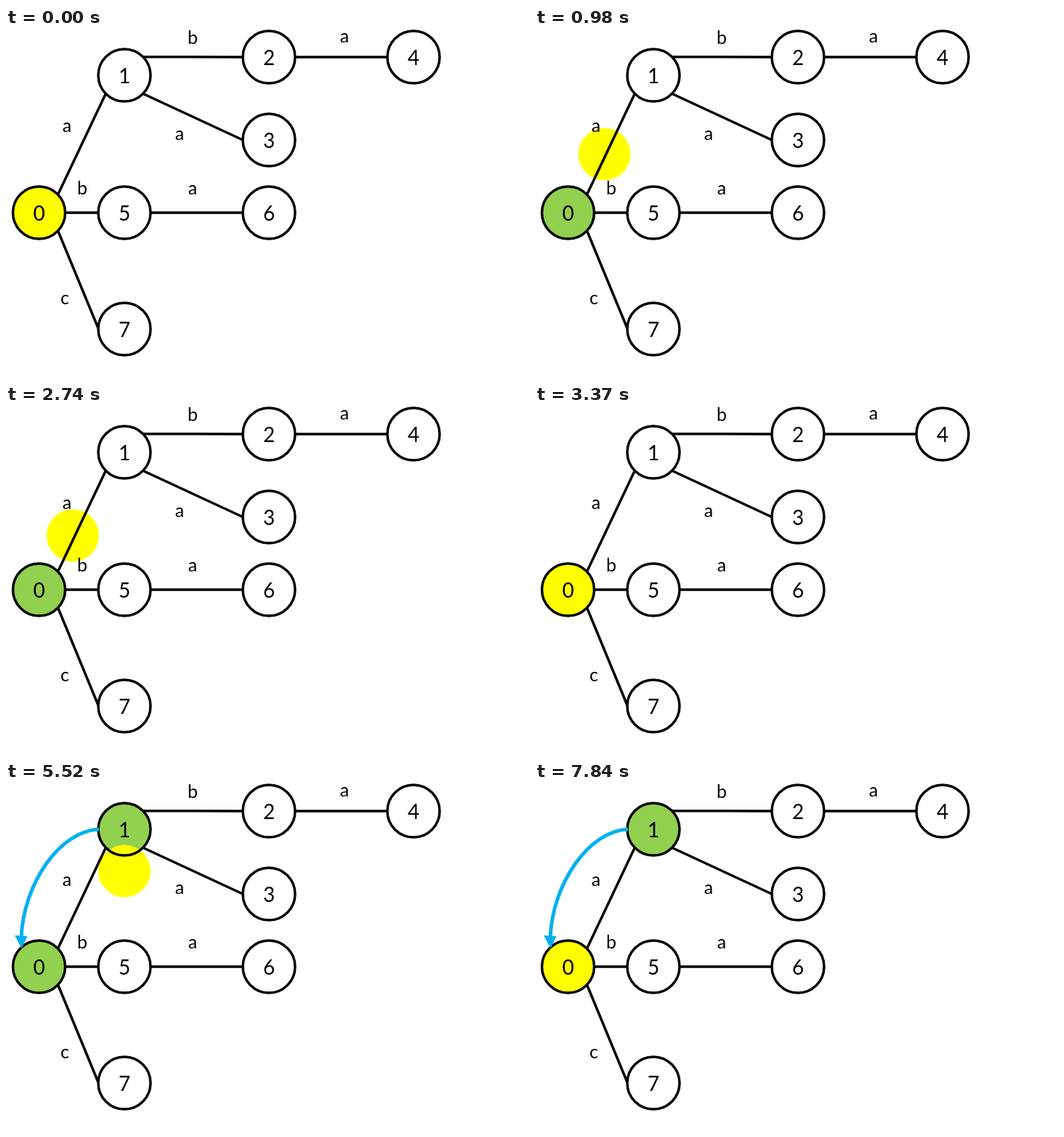
An HTML page with a canvas for the animation above (8 s loop, 720 px wide and 480 px high).

```html
<!DOCTYPE html>
<html lang="en">
<head>
<meta charset="utf-8">
<title>Trie traversal</title>
<style>
  html, body { margin: 0; width: 100%; height: 100%; overflow: hidden; background: #fff; }
  canvas { display: block; }
</style>
</head>
<body>
<canvas id="stage" width="720" height="480"></canvas>
<script>
const ctx = document.getElementById('stage').getContext('2d');
const LOOP = 8000, RADIUS = 36, GLIDE = 900;
const YELLOW = '#ffff00', GREEN = '#92d050', BLUE = '#00b0f0';

const nodes = [[45.5, 254], [163, 65], [362, 40], [362, 154],
               [561, 40], [163, 254], [362, 254], [163, 414]];

const edges = [[72, 228, 137, 91], [82, 254, 127, 254], [72, 280, 127, 413],
               [189, 39.5, 326, 40], [190, 91, 326, 154],
               [398, 40, 525, 40], [199, 254, 326, 254]];

const labels = [['a', 84, 143], ['b', 105, 229], ['c', 81, 380], ['b', 257, 22],
                ['a', 239, 154], ['a', 466, 20], ['a', 257, 229]];

// Each move advances in short held poses; glide is when its easing begins.
const moves = [
  { from: 0, to: 1, first: 510, last: 1670, steps: 12, glide: 775 },
  { from: 1, to: 0, first: 2450, last: 3370, steps: 9, glide: 2422 },
  { from: 0, to: 1, first: 3950, last: 4760, steps: 7, glide: 3905 },
  { from: 1, to: 5, first: 5440, last: 6430, steps: 10, glide: 5390 },
  { from: 5, to: 0, first: 7030, last: 7840, steps: 7, glide: 6980 }
];

const clamp = x => Math.max(0, Math.min(1, x));
const easeOut = x => 1 - (1 - x) ** 2;

function poseAt(t) {
  const index = moves.findLastIndex(m => t >= m.first);
  if (index < 0) return { index, step: 0, time: 0, x: nodes[0][0], y: nodes[0][1] };
  const m = moves[index], interval = (m.last - m.first) / m.steps;
  const step = Math.min(m.steps, Math.floor((t - m.first + 20) / interval));
  const time = m.first + step * interval;
  const p = step === m.steps ? 1 : easeOut(clamp((time - m.glide) / GLIDE));
  const [x0, y0] = nodes[m.from], [x1, y1] = nodes[m.to];
  return { index, step, time, x: x0 + (x1 - x0) * p, y: y0 + (y1 - y0) * p };
}

function disc(x, y, color) {
  ctx.fillStyle = color;
  ctx.beginPath();
  ctx.arc(x, y, RADIUS, 0, 2 * Math.PI);
  ctx.fill();
}

function drawArrow(alpha) {
  ctx.globalAlpha = alpha;
  ctx.strokeStyle = ctx.fillStyle = BLUE;
  ctx.lineWidth = 5;
  ctx.stroke(new Path2D('M128 65C74 67 24 140 21 214'));
  ctx.fill(new Path2D('M12 211L29.5 212L21.5 229Z'));
  ctx.globalAlpha = 1;
}

function draw(t) {
  const pose = poseAt(t);
  ctx.fillStyle = '#fff';
  ctx.fillRect(0, 0, 720, 480);

  if (pose.index >= 0) disc(...nodes[0], GREEN);
  if (pose.index >= 3) disc(...nodes[1], GREEN);
  disc(pose.x, pose.y, YELLOW);

  ctx.strokeStyle = ctx.fillStyle = '#000';
  ctx.lineWidth = 3.5;
  ctx.textAlign = 'center';
  ctx.beginPath();
  for (const [x0, y0, x1, y1] of edges) {
    ctx.moveTo(x0, y0);
    ctx.lineTo(x1, y1);
  }
  for (const [x, y] of nodes) {
    ctx.moveTo(x + RADIUS, y);
    ctx.arc(x, y, RADIUS, 0, 2 * Math.PI);
  }
  ctx.stroke();

  ctx.font = '28px Lato, sans-serif';
  nodes.forEach(([x, y], i) => ctx.fillText(i, x, y + 11));
  ctx.font = '25px Lato, sans-serif';
  for (const [text, x, y] of labels) ctx.fillText(text, x, y);

  const arrow = clamp((pose.time - 4255) / 505);
  if (arrow > 0) drawArrow(arrow);

  // Dip through black as the first move begins.
  if (pose.index === 0) {
    ctx.fillStyle = `rgba(0, 0, 0, ${1 - clamp(Math.abs(pose.step - 2) / 2.5)})`;
    ctx.fillRect(0, 0, 720, 480);
  }
}

function tick() {
  draw(performance.now() % LOOP);
  requestAnimationFrame(tick);
}
tick();
</script>
</body>
</html>
```
